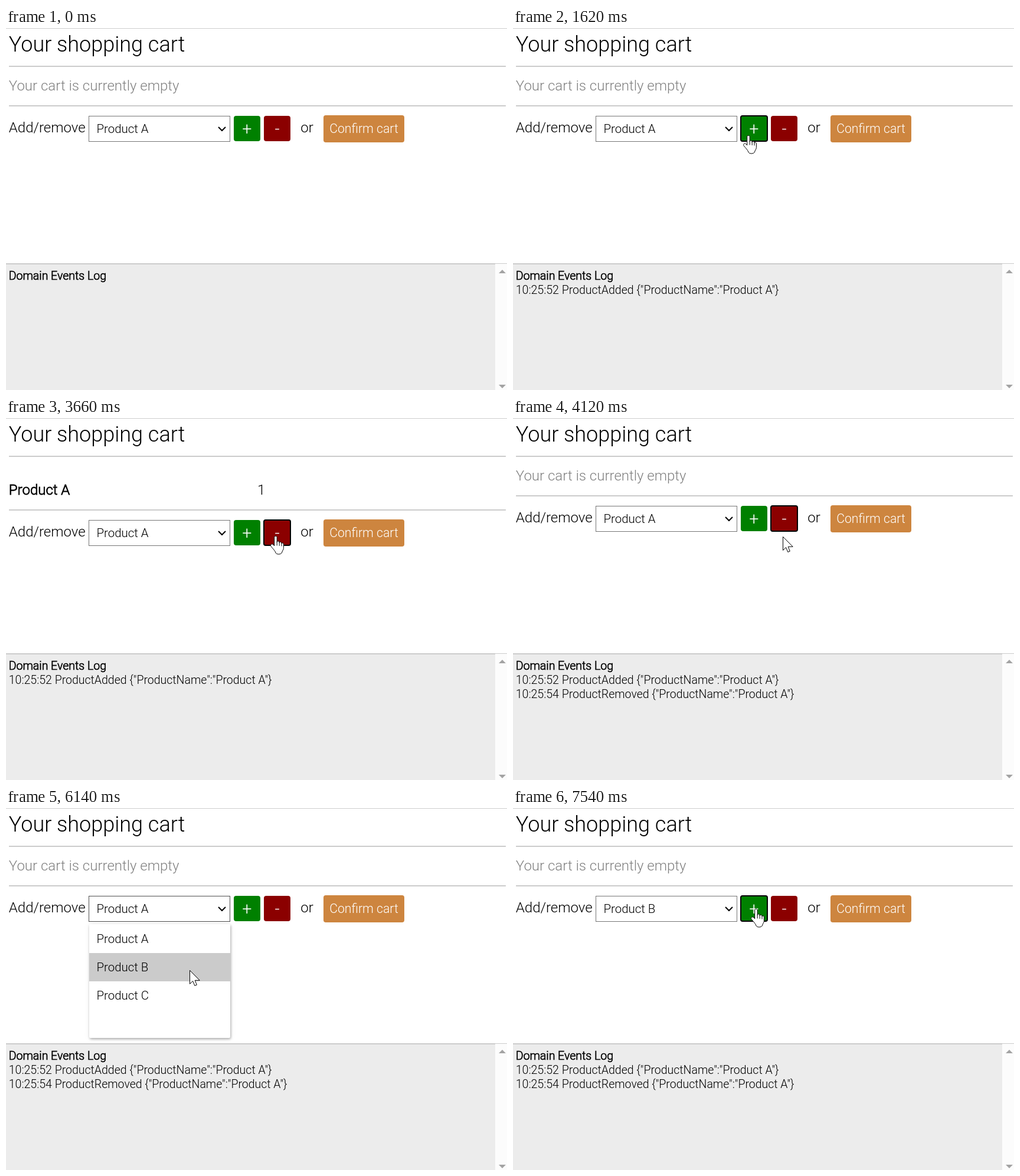
Write an HTML page that moves like this. It is 849 px wide and 614 px high and loops after 8 s.

```html
<!DOCTYPE html>
<html lang="en">
<head>
<meta charset="utf-8">
<title>Shopping cart</title>
<style>
  html, body { margin: 0; width: 100%; height: 100%; overflow: hidden; background: #fff; }
  svg { display: block; width: 849px; height: 614px; }
  text { font: 300 24px Roboto, "Open Sans", sans-serif; fill: #000; white-space: pre; }
  .title { font-size: 36px; }
  .muted { fill: #808080; }
  .bold { stroke: #000; stroke-width: .034em; }
  .field { font-size: 20.4px; }
  .log { font-size: 19.5px; }
  .sign, .confirm { font-weight: 350; fill: #fff; text-anchor: middle; }
  .sign { font-size: 28.8px; }
  .confirm { font-size: 21.2px; }
  .rule { fill: #ccc; }
  .ring { fill: none; stroke: #000; stroke-width: 2; }
  .popup { filter: drop-shadow(1px 2px 2px rgba(0, 0, 0, .32)) drop-shadow(0 0 5px rgba(0, 0, 0, .05)); }
  .cursor path { fill: #fff; stroke: #000; stroke-width: 1; stroke-linejoin: round; stroke-linecap: round; }
  .cursor .line { fill: none; }
</style>
</head>
<body>
<svg viewBox="0 0 849 614">
  <rect class="rule" width="849" height="1"/>
  <text class="title" x="4.8" y="40">Your shopping cart</text>
  <rect class="rule" x="5" y="64" width="842" height="2"/>

  <text id="empty" class="muted" x="4.8" y="106">Your cart is currently empty</text>
  <g id="item">
    <text class="bold" x="4.8" y="130">Product A</text>
    <text x="426" y="130">1</text>
  </g>

  <g id="form">
    <rect class="rule" x="5" y="131" width="842" height="2"/>
    <text x="4.8" y="177">Add/remove</text>
    <rect id="select" x="140.5" y="149.5" width="239" height="43" fill="#fff"/>
    <text id="choice" class="field" x="153.5" y="178"></text>
    <path d="M360 168l6 6 6-6" fill="none" stroke="#000" stroke-width="2"/>
    <rect x="386" y="149" width="45" height="43" rx="4" fill="#008000"/>
    <rect id="ringPlus" class="ring" x="386" y="149" width="45" height="43" rx="3"/>
    <text class="sign" x="408.5" y="180.5">+</text>
    <rect x="437" y="149" width="45" height="43" rx="4" fill="#8b0000"/>
    <rect id="ringMinus" class="ring" x="437" y="149" width="45" height="43" rx="3"/>
    <text class="sign" x="459.5" y="180.5">-</text>
    <text x="499.3" y="177">or</text>
    <rect x="538" y="148" width="137" height="46" rx="4" fill="#cd853f"/>
    <text class="confirm" x="606.5" y="178">Confirm cart</text>
  </g>

  <rect y="400" width="829" height="214" fill="#ececec"/>
  <rect class="rule" y="399" width="849" height="2"/>
  <rect x="829" y="400" width="20" height="214" fill="#fcfcfc"/>
  <path d="M835 416l6-6 6 6zM835 605l6 6 6-6z" fill="#a3a3a3"/>
  <text class="log bold" x="4.8" y="427">Domain Events Log</text>
  <text id="added" class="log" x="4.8" y="451">10:25:52 ProductAdded {"ProductName":"Product A"}</text>
  <text id="removed" class="log" x="4.8" y="475">10:25:54 ProductRemoved {"ProductName":"Product A"}</text>

  <g id="popup">
    <rect class="popup" x="141" y="197" width="239" height="193" rx="2" fill="#fff"/>
    <rect id="hover" x="141" width="239" height="48" fill="#cbcbcb"/>
    <text class="field" x="153.5" y="229">Product A</text>
    <text class="field" x="153.5" y="277">Product B</text>
    <text class="field" x="153.5" y="325">Product C</text>
  </g>

  <circle id="click" r="18" fill="#ff0" fill-opacity=".5"/>
  <g id="cursor" class="cursor">
    <path id="arrow" d="M.5.8V23.4L5.6 18.5 8.8 26.4 12.3 25 9.2 17.3H16.8Z"/>
    <g id="hand">
      <path d="M-2.3 15.5V1.4C-2.3-1.4 2.2-1.4 2.2 1.4V9.6C2.2 7.3 6.2 7.3 6.2 10V10.8C6.2 8.6 10 8.8 10 11.3V12C10 10.2 13.4 10.5 13.4 13V19.5C13.4 23 11 24 10.6 27C9.5 31 .5 31-.2 27C-1.5 23.5-5 20.5-8 16.5C-9.5 14-6.5 11.6-4.5 13.4Z"/>
      <path class="line" d="M2.2 9.6V15M6.2 10.5V15.5M10 12V16"/>
    </g>
  </g>
</svg>
<script>
const LOOP = 8000;
const ROW = 24;
const $ = id => document.getElementById(id);
const show = (id, on) => $(id).setAttribute("visibility", on ? "visible" : "hidden");
const within = (t, a, b) => t >= a && t < b;

const easeOut = u => u * (2 - u);
const smooth = u => u * u * (3 - 2 * u);

// Pointer moves: start, end, number of steps, first point, last point, easing
const moves = [
  [450, 1070, 9, [634, 572], [399, 183], smooth],
  [2020, 2020, 1, [400, 182], [400, 182], easeOut],
  [2720, 3030, 5, [409, 192], [457, 201], easeOut],
  [5130, 5130, 1, [451, 201], [451, 201], easeOut],
  [5300, 5600, 5, [440, 199], [362, 183], easeOut],
  [6060, 6210, 3, [326, 257], [306, 281], easeOut],
  [6850, 7390, 8, [308, 276], [412, 172], smooth]
];

// Mouse button held down: from, to
const presses = [[1240, 1310], [3510, 3660], [5750, 5830], [6610, 6680], [7463, 7540]];

function pointer(t) {
  const move = moves.filter(m => t >= m[0]).pop();
  if (!move) return null;
  const [start, end, steps, from, to, ease] = move;
  if (steps === 1) return to;
  const gap = (end - start) / (steps - 1);
  const step = Math.min(steps - 1, Math.floor((t - start) / gap + 1e-6));
  const u = ease(step / (steps - 1));
  return from.map((v, i) => v + (to[i] - v) * u);
}

function draw(t) {
  const filled = within(t, 1870, 4120);
  const open = within(t, 5750, 6680);
  const pressed = presses.some(([a, b]) => within(t, a, b));
  const shift = filled ? ROW : 0;
  const pos = pointer(t);
  const over = (x, w) => !!pos && pos[0] >= x && pos[0] < x + w
    && pos[1] >= 149 + shift && pos[1] < 192 + shift;

  show("empty", !filled);
  show("item", filled);
  $("form").setAttribute("transform", `translate(0 ${shift})`);
  $("choice").textContent = t < 6680 ? "Product A" : "Product B";
  show("ringPlus", within(t, 1240, 3510) || t >= 7463);
  show("ringMinus", within(t, 3510, 5750));

  const edge = open && pressed && t < 6000 ? "#8d8d8d"
    : open || over(140, 240) ? "#4f4f4f" : "#767676";
  $("select").setAttribute("stroke", edge);

  show("added", t >= 1620);
  show("removed", t >= 3890);
  show("popup", open);
  $("hover").setAttribute("y", t < 6060 ? 198 : 246);

  const hand = !open && (over(386, 45) || over(437, 45));
  show("click", pressed);
  show("arrow", pos && !hand);
  show("hand", pos && hand);
  if (pos) {
    const [x, y] = pos.map(Math.round);
    $("cursor").setAttribute("transform", `translate(${x} ${y})`);
    $("click").setAttribute("cx", x);
    $("click").setAttribute("cy", y - 1);
  }
}

const origin = performance.now();
function tick() {
  draw((performance.now() - origin) % LOOP);
  requestAnimationFrame(tick);
}
tick();
</script>
</body>
</html>
```
